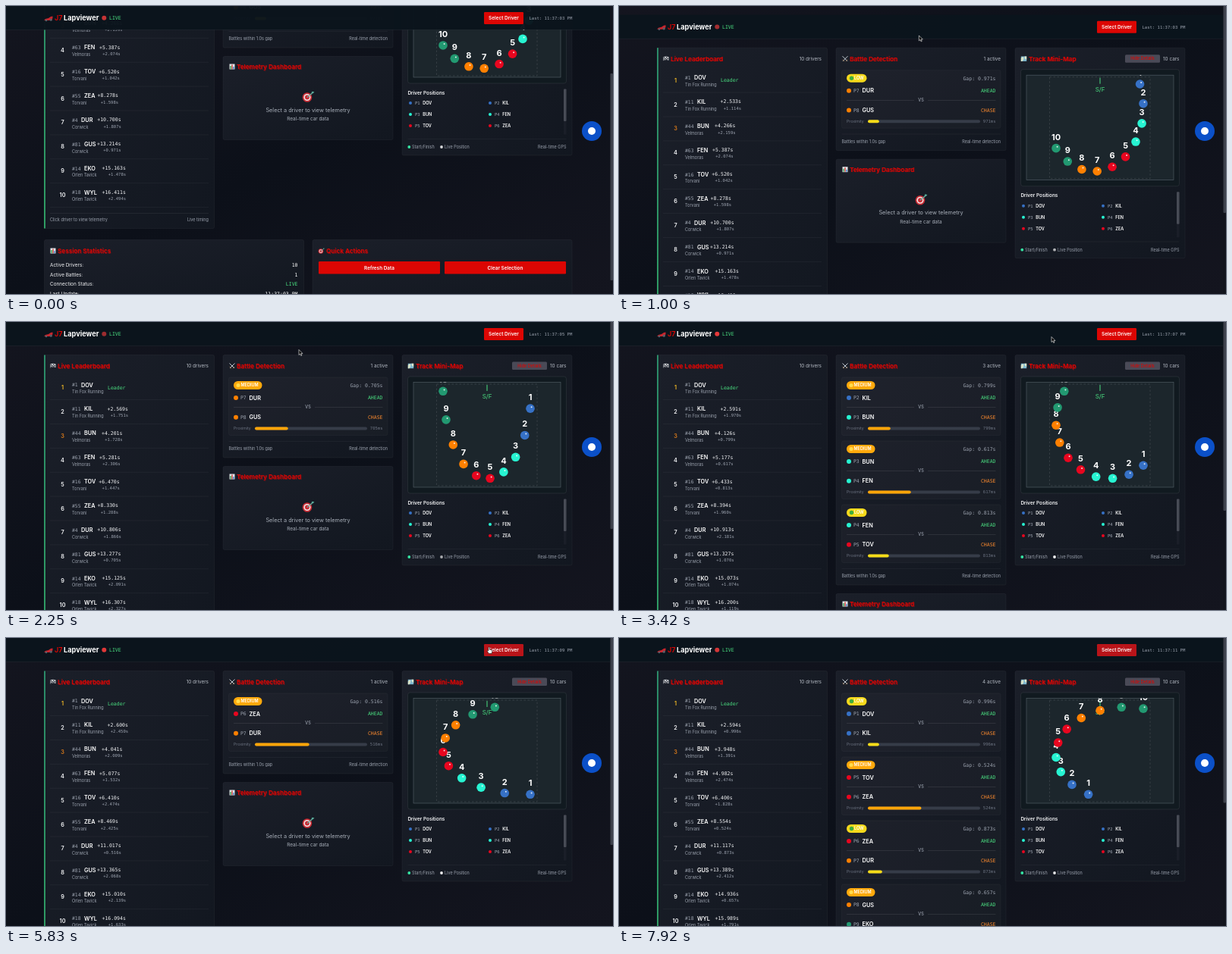
An HTML page that plays this animation: 800 by 380 pixels, repeating every 8000 ms.

```html
<!DOCTYPE html>
<html lang="en">
<head>
<meta charset="utf-8">
<title>Race dashboard</title>
<style>
html, body { margin: 0; width: 100%; height: 100%; overflow: hidden; background: #0d1119; }
svg { display: block; width: 800px; height: 380px; }
text { font-family: Inter, sans-serif; white-space: pre; }
.mono { font-family: "DejaVu Sans Mono", monospace; }
</style>
</head>
<body>
<svg id="stage" viewBox="0 0 800 380">
  <defs>
    <linearGradient id="bg" x1="0" y1="0" x2="1" y2="1">
      <stop offset="0" stop-color="#14151f"/><stop offset=".5" stop-color="#0c1019"/><stop offset="1" stop-color="#14151f"/>
    </linearGradient>
    <linearGradient id="card" x1="0" y1="0" x2="1" y2="1">
      <stop offset="0" stop-color="#1b1f29"/><stop offset="1" stop-color="#121720"/>
    </linearGradient>
    <linearGradient id="edge" x1="0" y1="0" x2="0" y2="1">
      <stop offset="0" stop-color="#2b8a68"/><stop offset="1" stop-color="#2f9d63"/>
    </linearGradient>
    <clipPath id="mapClip"><rect x="537" y="79.5" width="194" height="138.5"/></clipPath>
  </defs>
  <rect width="800" height="380" fill="url(#bg)"/>
  <g id="page"></g>
  <g id="header"></g>
  <rect x="796" width="4" height="380" fill="#12141d"/>
  <rect id="thumb" x="796.5" width="3.5" rx="1" fill="#3d414c"/>
  <circle cx="772" cy="165" r="13" fill="#0b50c8"/>
  <circle cx="772" cy="165" r="5" fill="#fff"/>
  <path id="arrow" d="M0 0V7L1.7 5.5 2.8 8 3.9 7.5 2.8 5.1H5Z" fill="#000" stroke="#fff" stroke-width=".6"/>
  <path id="hand" d="M-1.6-4.2Q-.8-5 0-4.2V-1.2L2.7-.5Q3.5-.2 3.3.8L2.7 4H-1.2L-3.2.8Q-3.2-.4-1.6.3Z" fill="#fff" stroke="#111" stroke-width=".6"/>
</svg>
<script>
const LOOP = 8000, UPDATES = [1200, 3050, 5100, 7100], FADE = 350;
const ACCENT = '#dc0603', GREEN = '#4ade80', GREY = '#9ca3af', DIM = '#6b7280', WHITE = '#f3f4f6';

const TEAMS = {
  tin: ['Tin Fox Running', '#3671c6'], vel: ['Velmoras', '#27f4d2'], tor: ['Torvani', '#e8061f'],
  cor: ['Corwick', '#ff8000'], orl: ['Orlen Tavick', '#229971']
};
// code, number, team, left edge of the gap column
const DRIVERS = [
  ['DOV', 1, 'tin', 134], ['KIL', 11, 'tin', 133.5], ['BUN', 44, 'vel', 126], ['FEN', 63, 'vel', 123],
  ['TOV', 16, 'tor', 122.3], ['ZEA', 55, 'tor', 120.5], ['DUR', 4, 'cor', 120.3], ['GUS', 81, 'cor', 120],
  ['EKO', 14, 'orl', 126.5], ['WYL', 18, 'orl', 126.5]
].map(([code, no, team, x]) => ({ code, no, x, team: TEAMS[team][0], color: TEAMS[team][1] }));

const GAPS = [
  [2.533, 4.266, 5.387, 6.520, 8.278, 10.700, 13.214, 15.163, 16.411],
  [2.569, 4.201, 5.281, 6.470, 8.330, 10.806, 13.277, 15.125, 16.307],
  [2.591, 4.126, 5.177, 6.433, 8.394, 10.913, 13.327, 15.073, 16.200],
  [2.600, 4.041, 5.077, 6.410, 8.469, 11.017, 13.365, 15.010, 16.094],
  [2.594, 3.948, 4.982, 6.400, 8.554, 11.117, 13.389, 14.936, 15.989]
];
const INTERVALS = [
  [1.114, 2.159, 2.074, 1.042, 1.598, 1.807, 0.971, 1.478, 2.494],
  [1.751, 1.728, 2.306, 1.447, 1.288, 1.866, 0.705, 2.091, 2.327],
  [1.970, 0.799, 0.617, 0.813, 1.960, 2.181, 1.070, 1.074, 1.119],
  [2.450, 2.009, 1.532, 2.474, 2.425, 0.516, 2.068, 2.139, 1.633],
  [0.996, 1.391, 2.474, 1.828, 0.524, 0.873, 2.412, 0.657, 1.791]
];

const $ = id => document.getElementById(id);
const clock = s => `11:37:${`${3 + 2 * s}`.padStart(2, '0')} PM`;
const battles = s => INTERVALS[s].map((gap, i) => ({ gap, ahead: i, low: gap > 0.8 })).filter(b => b.gap < 1);
const barWidth = b => 148 * Math.max(0.1, 1 - b.gap);
const barColor = b => b.low ? [246, 220, 24] : [255, 165, 8];

// y is the vertical middle of the line
function text(x, y, label, size, fill = WHITE, { w = 400, a = 'start', mono = false, o = 1 } = {}) {
  return `<text x="${x}" y="${y + size * 0.36}" font-size="${size}" fill="${fill}" font-weight="${w}" ` +
    `text-anchor="${a}" opacity="${o}"${mono ? ' class="mono"' : ''}>${label}</text>`;
}
const mono = (x, y, label, size, fill, a) => text(x, y, label, size, fill, { a, mono: true });
const bold = (x, y, label, size, fill, a) => text(x, y, label, size, fill, { a, w: 600 });
const right = (x, y, label, size, fill) => text(x, y, label, size, fill, { a: 'end' });
const rect = (x, y, w, h, fill, more = '') => `<rect x="${x}" y="${y}" width="${w}" height="${h}" fill="${fill}" ${more}/>`;
const dot = (x, y, r, fill, more = '') => `<circle cx="${x}" cy="${y}" r="${r}" fill="${fill}" ${more}/>`;
const line = (x1, y, x2, o = 0.07) => rect(x1, y, x2 - x1, 0.6, '#fff', `opacity="${o}"`);
const card = (x, y, w, h) => rect(x, y, w, h, 'url(#card)', 'rx="2" stroke="#fff" stroke-opacity=".07" stroke-width=".6"');
const title = (x, y, label) => text(x + 0.7, y + 0.7, label, 8.2, '#c00a10', { w: 600, o: 0.6 }) + bold(x, y, label, 8.2, ACCENT);
const button = (x, y, w, h, label, id = '') =>
  rect(x, y, w, h, ACCENT, `rx="1.2"${id && ` id="${id}"`}`) + bold(x + w / 2, y + h / 2, label, 6.4, '#fff', 'middle');

const at = (x, y, body, k = 1) => `<g transform="translate(${x} ${y}) scale(${k})">${body}</g>`;
const ICONS = {
  chart: rect(-3.5, -3.5, 7, 7, '#dfe5ea') + rect(-2.6, -1, 1.4, 4, '#36a852') + rect(-0.7, -2.6, 1.4, 5.6, '#d8433d') + rect(1.2, 0.2, 1.4, 2.8, '#3f7fd1'),
  target: dot(-1, 1, 6, '#c92c35') + dot(-1, 1, 4.3, '#f2e6e6') + dot(-1, 1, 2.8, '#c92c35') +
    '<path d="M-1 1L5-4" stroke="#6fa99c" stroke-width="1.4"/><path d="M4-3.4L5-6.5 8-6 6.5-4Z" fill="#58a897"/>',
  flag: '<path d="M-3.5-2.5Q0-4 3.5-2.5V2Q0 .5-3.5 2.5Z" fill="#d6d9dd"/>' +
    [[-3, -2], [0, -2.5], [-1.5, -0.7], [1.5, -0.9], [-3, 0.6], [0, 0.2]].map(p => rect(p[0], p[1], 1.5, 1.4, '#30343c')).join(''),
  swords: '<path d="M-3.5-3.5L3 3M3.5-3.5L-3 3" stroke="#c3cbd3" stroke-width="1"/><path d="M1 3.4L3.4 1M-1 3.4L-3.4 1" stroke="#8a6a4a" stroke-width="1"/>',
  map: rect(-3.7, -3.2, 7.4, 6.4, '#7fb8cf') + '<path d="M-3.7-1L-1-3 0 0-2 3.2H-3.7ZM1-3.2H3.7V1L1.5 0Z" fill="#d9e4c9"/>',
  car: '<path d="M-5.5 1.5L-4 0 0-1 3-3 5.5-3.5V-1L4 2H-5.5Z" fill="#c9252d"/>' + dot(-3, 2, 1.3, '#59606a') + dot(3.2, 1.2, 1.6, '#59606a')
};

function leaderboard(s) {
  let out = card(50.5, 43.5, 224, 374) + rect(50, 43.5, 2, 374, 'url(#edge)') +
    at(62, 58, ICONS.flag) + title(68, 58, 'Live Leaderboard') + right(267, 58, '10 drivers', 6.4, '#b4bac3');
  DRIVERS.forEach((d, i) => {
    const y = 86.3 + 31.92 * i, no = '#' + d.no;
    out += bold(74.5, y, i + 1, 7.3, i === 0 ? '#fbbf24' : i === 2 ? '#d97a1a' : WHITE, 'middle') +
      mono(87, y - 3.4, no, 6.4, GREY) + bold(91 + 4 * no.length, y - 3.4, d.code, 7.3, '#fff') +
      text(87, y + 5.8, d.team, 5.5, GREY) + line(58, y + 15.8, 267);
    if (!i) { out += mono(d.x, y, 'Leader', 6.5, GREEN); return; }
    const gap = `+${GAPS[s][i - 1].toFixed(3)}s`;
    out += mono(d.x, y - 3.8, gap, 6.5, WHITE) +
      mono(d.x + 3.95 * gap.length, y + 4.7, `+${INTERVALS[s][i - 1].toFixed(3)}s`, 5.55, GREY, 'end');
  });
  return out + line(58, 397, 267, 0.1) + text(58, 406, 'Click driver to view telemetry', 5.5, GREY) +
    right(267, 406, 'Live timing', 5.5, GREY);
}

function battle(b, n) {
  const y = 84 * n, [r, g, c] = barColor(b);
  const side = (i, yy, label, color) => {
    const d = DRIVERS[i];
    return dot(303, yy, 3, d.color) + mono(309, yy, 'P' + (i + 1), 6.4, GREY) + bold(320.5, yy, d.code, 7.3, '#fff') +
      mono(496.5, yy, label, 6.5, color, 'end');
  };
  const badge = b.low
    ? rect(300, 78, 26.5, 11, '#f6d91c', 'rx="5.5"') + dot(306.5, 83.5, 2.7, '#3fae3c') + bold(310, 83.5, 'LOW', 5.5, '#fff')
    : rect(300, 78, 37.5, 11, '#ffa90c', 'rx="5.5"') + dot(306, 83.5, 2.5, '#ffdc4e') + bold(309.5, 83.5, 'MEDIUM', 5.5, '#fff');
  return at(0, y, rect(293.5, 73, 209.5, 76.5, '#fff', 'fill-opacity=".018" stroke="#fff" stroke-opacity=".06" stroke-width=".6" rx="2"') +
    badge + mono(496.5, 83.5, `Gap: ${b.gap.toFixed(3)}s`, 6.5, GREY, 'end') +
    side(b.ahead, 100, 'AHEAD', GREEN) + line(300, 112.3, 389, 0.14) + text(398, 112.5, 'VS', 5.5, GREY, { a: 'middle', w: 500 }) +
    line(407, 112.3, 496.5, 0.14) + side(b.ahead + 1, 125.8, 'CHASE', '#fb8a2e') +
    text(300, 140.5, 'Proximity', 5.2, DIM) + rect(328, 138.5, 148, 4, '#363c48', 'rx="2"') +
    rect(328, 138.5, barWidth(b), 4, `rgb(${r},${g},${c})`, `rx="2" id="bar${n}"`) +
    mono(496.5, 140.5, Math.round(b.gap * 1000) + 'ms', 5.55, DIM, 'end'));
}

function middle(s) {
  const list = battles(s), extra = 84 * (list.length - 1);
  const bottom = line(293.5, 157, 503, 0.07) + text(293.5, 167.5, 'Battles within 1.0s gap', 5.5, GREY) +
    right(503, 167.5, 'Real-time detection', 5.5, GREY) + card(286, 190.5, 224, 110) + at(298, 204, ICONS.chart) +
    title(304, 204, 'Telemetry Dashboard') + at(398, 243.5, ICONS.target, 1.05) +
    text(398, 261, 'Select a driver to view telemetry', 7.3, '#a8afb9', { a: 'middle' }) +
    text(398, 273, 'Real-time car data', 6.4, '#a8afb9', { a: 'middle' });
  return card(286, 43.5, 224, 135.5 + extra) + at(298, 58, ICONS.swords) + title(304, 58, 'Battle Detection') +
    right(503, 58, `${list.length} active`, 6.4, '#b4bac3') + list.map(battle).join('') + at(0, extra, bottom);
}

// Cars sit 18° apart on a circle, then get fitted to the map box.
function carSpots(s) {
  const turn = DRIVERS.map((_, i) => (i - 6.2 + 2 * s) * Math.PI / 10);
  const fit = (list, lo) => {
    const min = Math.min(...list), max = Math.max(...list);
    return list.map(v => lo + 115 * (v - min) / (max - min));
  };
  const xs = fit(turn.map(a => -Math.sin(a)), 576), ys = fit(turn.map(Math.cos), 91.3);
  return xs.map((x, i) => [x, ys[i]]);
}

function trackMap(s) {
  const cars = carSpots(s).map(([x, y], i) => dot(x, y, 5.8, DRIVERS[i].color) + dot(x + 1.6, y - 1.9, 1, '#fff', 'opacity=".85"') +
    text(x, y - 15, i + 1, 11, '#fff', { a: 'middle', w: 700 })).join('');
  const legend = DRIVERS.slice(0, 6).map((d, i) => {
    const x = 533 + 105 * (i % 2), y = 252 + 15 * (i >> 1);
    return dot(x, y, 2, d.color) + mono(x + 6, y, 'P' + (i + 1), 5.5, GREY) + bold(x + 16.3, y, d.code, 5.5, '#fff');
  }).join('');
  return card(522, 43.5, 224, 277.5) + at(533.5, 58, ICONS.map) + title(540, 58, 'Track Mini-Map') +
    rect(667, 52.5, 46, 10.5, '#4a4a57', 'rx="1.5"') + text(690, 57.8, 'Hide Details', 5.5, ACCENT, { a: 'middle', w: 500 }) +
    right(738.5, 58, '10 cars', 6.4, '#b4bac3') +
    rect(529.5, 72, 209, 154, '#111a20', 'rx="3" stroke="#fff" stroke-opacity=".12" stroke-width=".6"') +
    rect(537, 79.5, 194, 138.5, '#1c262c', 'stroke="#56616a" stroke-width=".6"') +
    '<g clip-path="url(#mapClip)"><rect x="567.5" y="82" width="132.5" height="134" fill="none" stroke="#fff" stroke-opacity=".16" stroke-width=".7" stroke-dasharray="2.5 2.5"/>' +
    rect(633.5, 83, 1, 8, GREEN) + text(634, 98, 'S/F', 8, GREEN, { a: 'middle' }) + cars + '</g>' +
    bold(529.5, 238.3, 'Driver Positions', 6.4) + legend +
    rect(735, 233.5, 3.5, 60, '#1a1e28') + rect(735, 233.5, 3.5, 42.5, '#474b55', 'rx="1"') +
    line(529.5, 299, 738.5) + dot(531.3, 310, 1.9, '#35e6a4') + text(535, 310, 'Start/Finish', 5.5, GREY) +
    dot(574, 310, 1.9, '#fff', 'data-pulse=""') + text(578, 310, 'Live Position', 5.5, GREY) + right(738.5, 310, 'Real-time GPS', 5.5, GREY);
}

function lower(s) {
  const stats = [['Active Drivers:', 10], ['Active Battles:', battles(s).length], ['Connection Status:', 'LIVE'], ['Last Update:', clock(s)]];
  return card(50.5, 432.5, 342, 85) + at(62, 447, ICONS.chart) + title(68, 447, 'Session Statistics') +
    stats.map(([k, v], i) => text(58, 465.5 + 12.8 * i, k, 6.4, WHITE) +
      mono(384.5, 465.5 + 12.8 * i, v, 6.5, v === 'LIVE' ? GREEN : '#fff', 'end')).join('') +
    card(404, 432.5, 342, 85) + at(415.5, 447, ICONS.target, 0.55) + title(422, 447, 'Quick Actions') +
    button(412, 461, 160, 16.5, 'Refresh Data') + button(578, 461, 160, 16.5, 'Clear Selection');
}

function header(s) {
  return rect(0, 0, 796, 31.5, '#0b141c', 'opacity=".97"') + line(0, 31.2, 796, 0.08) + at(56, 17, ICONS.car) +
    bold(64, 16, 'J7', 9.2, ACCENT) + text(76, 16, 'Lapviewer', 9.2, '#fff', { w: 700 }) +
    dot(129.3, 15.8, 3, '#ef3b3b', 'data-pulse=""') + mono(136, 16, 'LIVE', 6.5, GREEN) +
    button(630, 8, 52, 16, 'Select Driver', 'select') + mono(746.3, 16, `Last: ${clock(s)}`, 5.55, GREY, 'end');
}

// Eased value between [time, value] stops
function track(t, stops) {
  if (t <= stops[0][0]) return stops[0][1];
  for (let i = 1; i < stops.length; i++) {
    const [t0, a] = stops[i - 1], [t1, b] = stops[i];
    if (t < t1) { const k = (t - t0) / (t1 - t0); return a + (b - a) * k * k * (3 - 2 * k); }
  }
  return stops[stops.length - 1][1];
}

let shown = -1;
function draw(t) {
  const s = UPDATES.filter(u => t >= u).length;
  if (s !== shown) {
    shown = s;
    $('page').innerHTML = lower(s) + leaderboard(s) + middle(s) + trackMap(s);
    $('header').innerHTML = header(s);
  }
  const list = battles(s);
  if (s) {
    const old = battles(s - 1), k = track(t, [[UPDATES[s - 1], 0], [UPDATES[s - 1] + FADE, 1]]);
    list.slice(0, old.length).forEach((b, n) => {
      const mix = (p, q) => p + (q - p) * k, from = barColor(old[n]), bar = $('bar' + n);
      bar.setAttribute('width', mix(barWidth(old[n]), barWidth(b)));
      bar.setAttribute('fill', `rgb(${barColor(b).map((c, i) => Math.round(mix(from[i], c)))})`);
    });
  }

  const scroll = track(t, [[80, 124], [690, -30], [800, -30], [1150, 0]]);
  $('page').setAttribute('transform', `translate(0 ${-scroll})`);
  $('header').setAttribute('transform', `translate(0 ${Math.max(0, -scroll)})`);
  const height = 529 + Math.max(0, 84 * (list.length - 1) - 117);
  $('thumb').setAttribute('y', Math.max(0, scroll) * 380 / height);
  $('thumb').setAttribute('height', 380 * 380 / height);

  const pulse = 0.75 + 0.25 * Math.cos((t - 1600) * Math.PI / 1000);
  document.querySelectorAll('[data-pulse]').forEach(e => e.setAttribute('opacity', pulse));

  const x = track(t, [[850, 401.5], [1200, 386], [2650, 386], [3400, 570], [3480, 570], [4000, 637.5]]);
  const y = track(t, [[850, 40.5], [1200, 36.5], [2650, 36.5], [3400, 19.5], [3480, 19.5], [4000, 16.5]]);
  const hover = t > 3880, visible = t > 450 && t < 6950;
  $('select').setAttribute('fill', hover ? '#b91419' : ACCENT);
  for (const [id, on] of [['arrow', !hover], ['hand', hover]]) {
    $(id).setAttribute('transform', `translate(${x} ${y})`);
    $(id).setAttribute('visibility', on && visible ? 'visible' : 'hidden');
  }
}

const start = performance.now();
(function tick() {
  draw((performance.now() - start) % LOOP);
  requestAnimationFrame(tick);
})();
</script>
</body>
</html>
```
